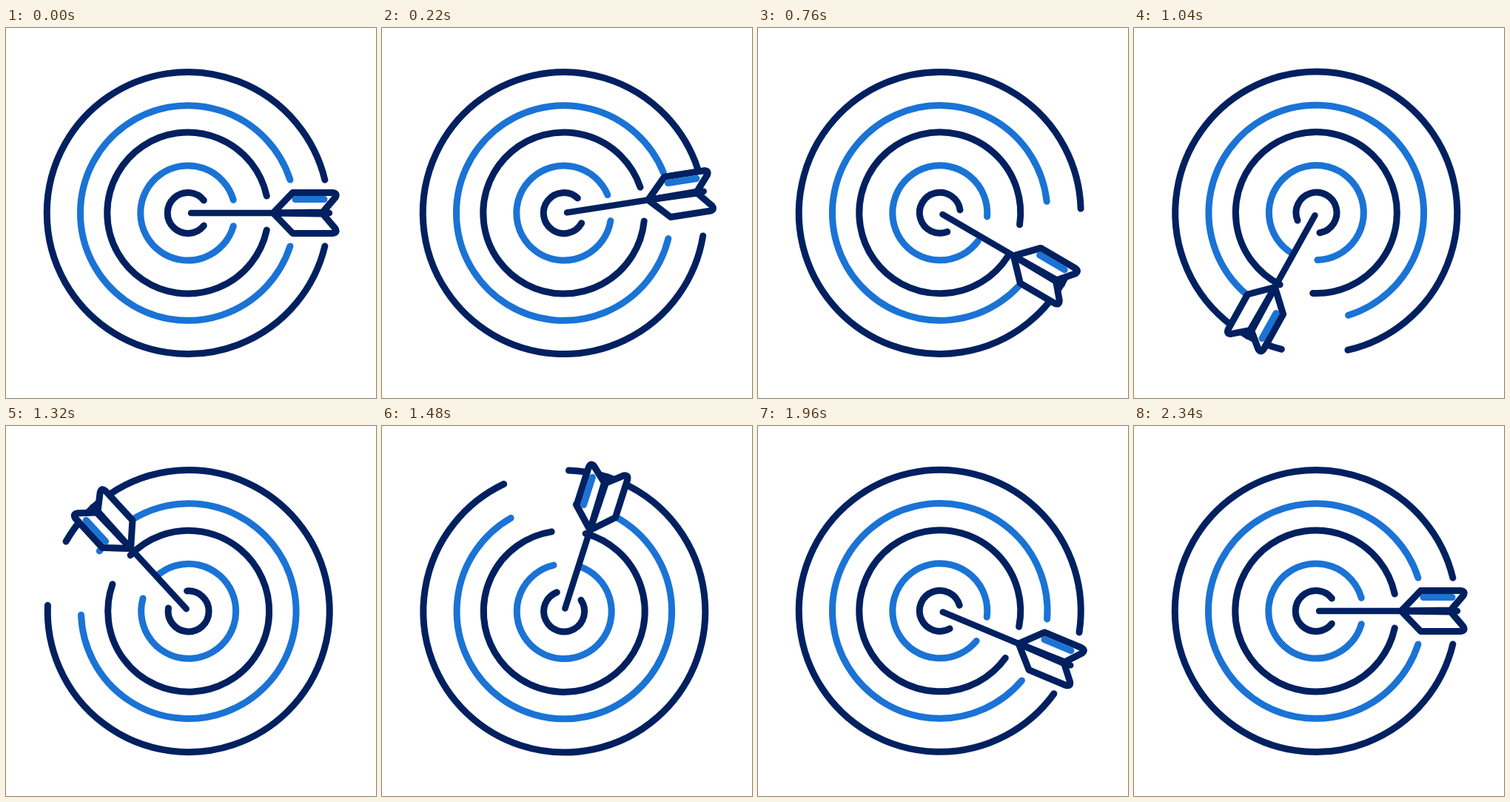
Animation of 500x500 px, one loop 2.4 s. Source, as an HTML page:

```html
<!DOCTYPE html>
<html lang="en">
<head>
<meta charset="utf-8">
<title>Target</title>
<style>
  html, body { margin: 0; width: 100%; height: 100%; overflow: hidden; background: #fff; }
  svg { display: block; width: 100vw; height: 100vh; }
  path { fill: none; stroke-linecap: round; stroke-linejoin: round; stroke-width: 9; }
  .navy { stroke: #002060; }
  .blue { stroke: #1a73d5; }
  .fin { fill: #fff; }
</style>
</head>
<body>
<svg viewBox="0 0 500 500">
  <g id="outer"></g>
  <g id="middle"></g>
  <g id="inner"></g>
  <g id="arrow">
    <path class="navy fin" d="M361 250L387.5 222.5H441Q448.5 223 445 229L428 249Z"/>
    <path class="navy fin" d="M361 250L387.5 277.5H441Q448.5 277 445 271L428 251Z"/>
    <path class="blue" d="M391 231.5H430"/>
    <path class="navy" d="M361 250L387.5 222.5H441Q448.5 223 445 229L428 249M250 250H437" style="stroke-width:8.5"/>
  </g>
</svg>
<script>
const LOOP = 2400, STEP = 20, PIVOT = '246.25 250';
const CX = 245.75, CY = 250;
const el = id => document.getElementById(id);

// Open ring whose gap is centred on the right-hand side.
function ring(group, r, halfGap, color) {
  const a = halfGap * Math.PI / 180;
  const x = CX + r * Math.cos(a), dy = r * Math.sin(a);
  const p = document.createElementNS('http://www.w3.org/2000/svg', 'path');
  p.setAttribute('class', color);
  p.setAttribute('d', `M${x} ${CY + dy}A${r} ${r} 0 1 1 ${x} ${CY - dy}`);
  el(group).append(p);
}
ring('outer', 190.5, 13.6, 'navy');
ring('outer', 145.3, 18, 'blue');
ring('middle', 109, 12.2, 'navy');
ring('middle', 64, 16, 'blue');
ring('inner', 27.5, 38.5, 'navy');

// Cubic timing curve with flat ends.
function ease(x, x1, x2) {
  let lo = 0, hi = 1;
  for (let i = 0; i < 24; i++) {
    const u = (lo + hi) / 2, v = 1 - u;
    if (3 * x1 * u * v * v + 3 * x2 * u * u * v + u * u * u < x) lo = u; else hi = u;
  }
  return lo * lo * (3 - 2 * lo);
}

// Wind back, spin past a full turn, settle.
const moves = [
  [0, 420, 0, -16.5, 1 / 3, 2 / 3],
  [420, 1920, -16.5, 383.5, 0.355, 0.713],
  [1920, 2260, 383.5, 360, 1 / 3, 2 / 3]
];
function angle(t) {
  if (t <= 0) return 0;
  for (const [t0, t1, a, b, x1, x2] of moves)
    if (t < t1) return a + (b - a) * ease((t - t0) / (t1 - t0), x1, x2);
  return 360;
}

const delays = { arrow: 0, inner: 0, middle: 40, outer: 80 };
function draw(now) {
  const t = Math.floor((now + 1) / STEP) * STEP % LOOP;
  for (const id in delays)
    el(id).setAttribute('transform', `rotate(${angle(t - delays[id])} ${PIVOT})`);
}
function tick(now) {
  draw(now);
  requestAnimationFrame(tick);
}
draw(0);
requestAnimationFrame(tick);
</script>
</body>
</html>
```
